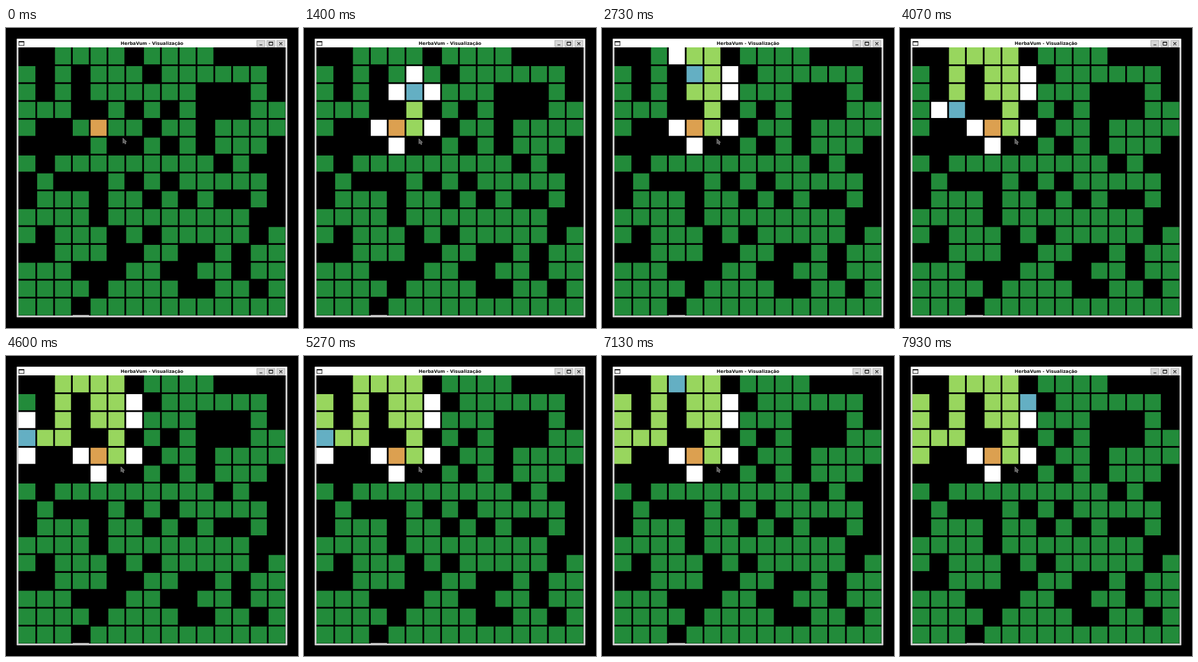
An HTML page that plays this animation: 468x480 px, repeating every 8000 ms.

```html
<!DOCTYPE html>
<html lang="pt">
<head>
<meta charset="utf-8">
<title>HerbaVum - Visualização</title>
<style>
  html, body { margin: 0; width: 100%; height: 100%; overflow: hidden; background: #000; }
  svg { display: block; width: 468px; height: 480px; }
  text { font: bold 7.2px "DejaVu Sans", sans-serif; }
</style>
</head>
<body>
<svg viewBox="0 0 468 480">
  <rect x="17" y="17" width="434" height="446" rx="1" fill="#c8c8c8"/>
  <rect x="18" y="17.5" width="432" height="13.5" fill="#fff"/>
  <g fill="none" stroke="#222" stroke-width="1">
    <rect x="20.8" y="21.5" width="8" height="6.5" fill="#fff"/>
    <path d="M20.5 22.3h8.6" stroke-width="1.4"/>
  </g>
  <text x="234" y="27" text-anchor="middle" fill="#111">HerbaVum - Visualização</text>
  <g fill="#d8d8d8" stroke="#a0a0a0" stroke-width=".8">
    <rect x="402" y="20" width="13" height="10"/>
    <rect x="418" y="20" width="13" height="10"/>
    <rect x="434" y="20" width="13" height="10"/>
  </g>
  <g fill="none" stroke="#111" stroke-width="1.2">
    <path d="M406.3 27h4.5M438.2 22.8l4.6 4.6m0-4.6l-4.6 4.6"/>
    <path d="M421.6 22.5h6v5h-6zM421.2 23h6.8" stroke-width="1"/>
  </g>
  <rect x="20" y="31" width="428" height="429" fill="#000"/>
  <g id="board"></g>
  <rect x="107" y="459" width="26" height="1" fill="#aaa"/>
  <path id="cursor" d="M0 0v8l1.9-1.7 1.4 3 1.4-.7-1.4-2.8h2.5z" fill="#555" stroke="#aaa" stroke-width=".7"/>
</svg>
<script>
const MAP = [
  '..####.####....',
  '#.#.###.######.',
  '#.#.######...#.',
  '###..#.#.#...##',
  '#..####.##.####',
  '....#..#.#.###.',
  '#.#########.#..',
  '.#...#.#.#####.',
  '.###.##.#.#..#.',
  '####.########..',
  '#.###.#.#####.#',
  '..###..##..#.##',
  '###...##..##.##',
  '####.####..##.#',
  '###.###########'
];
const SIZE = MAP.length;
const COLOR = { free: '#228b3a', seen: '#fff', done: '#98d65e', here: '#64afc3', start: '#dca050' };
const START = 4 * SIZE + 4;
const LOOP = 8000, TICKS_PER_MS = 15 / 1000;
const FIRST_TICK = 11;
const DWELL = '433343334343333433333434343334333'; // ticks spent on each step

const board = document.getElementById('board');
const cursor = document.getElementById('cursor');
const cells = new Map();

function addCell(row, col) {
  const rect = document.createElementNS('http://www.w3.org/2000/svg', 'rect');
  const edge = (origin, pitch, i) => [
    origin + pitch * i + (i ? 1.4 : 0),
    origin + pitch * (i + 1) - (i < SIZE - 1 ? 1.4 : 0.3)
  ];
  const [x0, x1] = edge(20, 428 / SIZE, col);
  const [y0, y1] = edge(31, 429 / SIZE, row);
  const box = { x: x0, y: y0, width: x1 - x0, height: y1 - y0 };
  for (const key in box) rect.setAttribute(key, box[key]);
  board.append(rect);
  cells.set(row * SIZE + col, rect);
}

MAP.forEach((line, row) => [...line].forEach((mark, col) => mark === '#' && addCell(row, col)));

// Neighbours in search order: up, right, down, left.
function neighbours(id) {
  const col = id % SIZE;
  return [id - SIZE, col < SIZE - 1 ? id + 1 : -1, id + SIZE, col ? id - 1 : -1]
    .filter(n => cells.has(n));
}

// Depth-first walk, recording every move including the way back.
function walk(id, trail = [], visited = new Set()) {
  visited.add(id);
  trail.push(id);
  for (const next of neighbours(id)) {
    if (visited.has(next)) continue;
    walk(next, trail, visited);
    trail.push(id);
  }
  return trail;
}

const trail = walk(START);
const arrivals = [FIRST_TICK];
for (const ticks of DWELL) arrivals.push(arrivals.at(-1) + Number(ticks));

function render(time) {
  const tick = Math.floor((time + 4) * TICKS_PER_MS);
  const path = trail.slice(0, arrivals.filter(a => a <= tick).length);
  const done = new Set(path);
  const seen = new Set(path.flatMap(neighbours));
  const here = path.at(-1);
  cells.forEach((rect, id) => {
    const state = id === START ? 'start' : id === here ? 'here'
      : done.has(id) ? 'done' : seen.has(id) ? 'seen' : 'free';
    rect.setAttribute('fill', COLOR[state]);
  });
  const drift = Math.min(tick, 2) / 2;
  cursor.setAttribute('transform', `translate(${187.5 - 3.3 * drift} ${176.3 + drift})`);
}

const began = performance.now();
function loop() {
  render((performance.now() - began) % LOOP);
  requestAnimationFrame(loop);
}
loop();
</script>
</body>
</html>
```
